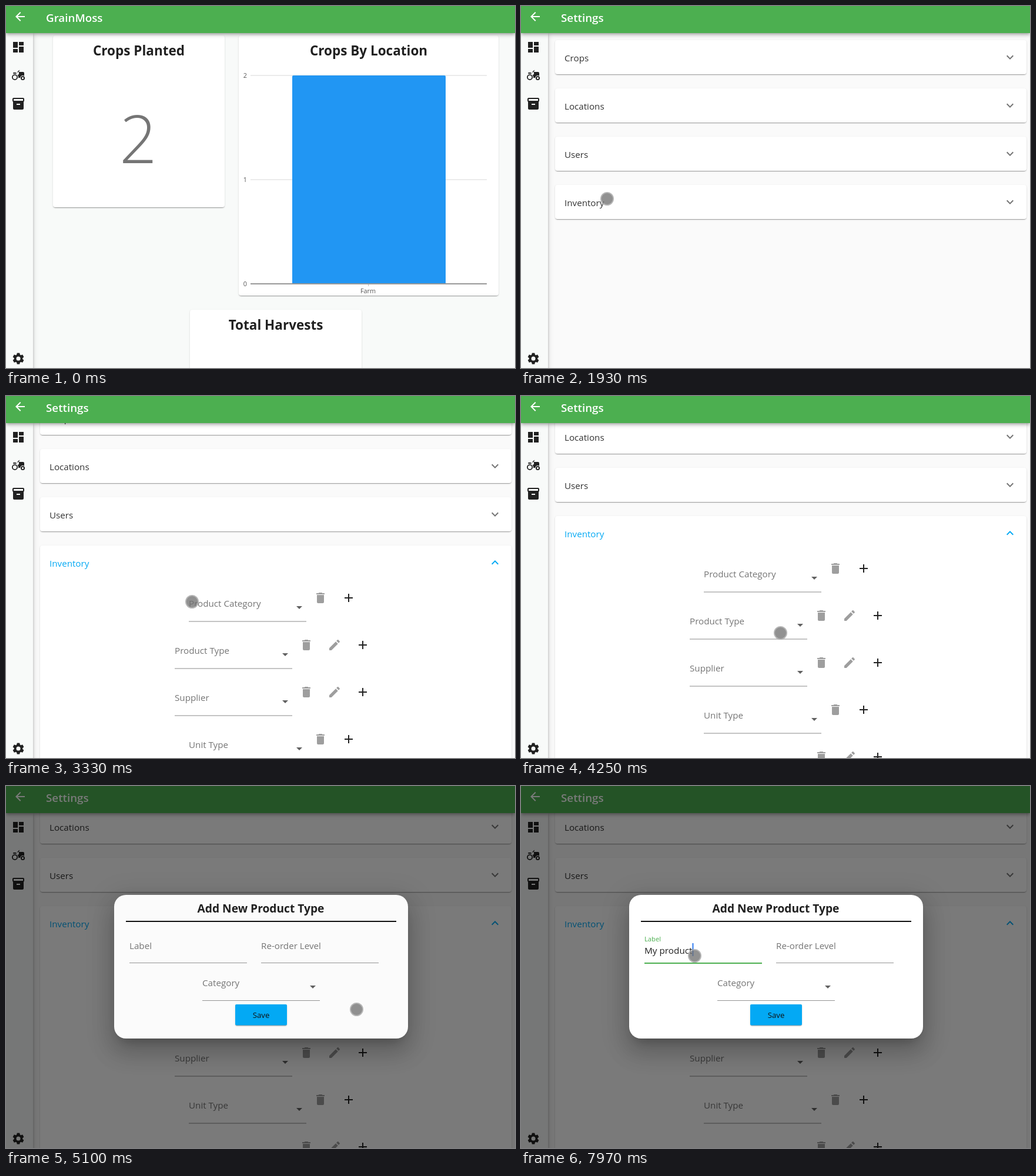
Recreate the animation shown at these times as an HTML page with a canvas. Size 866 by 615 pixels, loop 8 s.

```html
<!DOCTYPE html>
<html lang="en">
<head>
<meta charset="utf-8">
<title>Farm dashboard</title>
<style>
html, body { margin: 0; width: 100%; height: 100%; overflow: hidden; background: #fafafa; }
canvas { display: block; width: 866px; height: 615px; }
</style>
</head>
<body>
<canvas id="stage" width="866" height="615"></canvas>
<script>
const W = 866, H = 615, LOOP = 8000;
const ctx = document.getElementById('stage').getContext('2d');
const FONT = '"Open Sans", "Noto Sans", sans-serif';
const INK = '#212121', GREY = '#757575', PALE = '#9e9e9e', GREEN = '#4caf50', BLUE = '#03a9f4';

const ICONS = {
  back: 'M20 11H7.83l5.59-5.59L12 4l-8 8 8 8 1.41-1.41L7.83 13H20z',
  dashboard: 'M3 13h8V3H3zM3 21h8v-6H3zM13 21h8V11h-8zM13 3v6h8V3z',
  box: 'M20 2H4c-1 0-2 .9-2 2v3c0 .7.4 1.3 1 1.7V20c0 1.1 1.1 2 2 2h14c.9 0 2-.9 2-2V8.7c.6-.4 1-1 1-1.7V4c0-1.1-1-2-2-2zM15 14H9v-2h6zM20 7H4V4h16z',
  tractor: 'M19.5 12c.9 0 1.8.3 2.5.8V8c0-1.1-.9-2-2-2h-6.3l-1-1 1.4-1.5-.7-.7-3.6 3.6.7.7 1.5-1.5 1 1.3V9c0 1.1-.9 2-2 2h-.5c.9 1.1 1.5 2.5 1.5 4v1h3.1c.2-2.2 2.1-4 4.4-4zM4 9h5c0-1.1-.9-2-2-2H4c-1.3 0-1.3 2 0 2z',
  trash: 'M6 19c0 1.1.9 2 2 2h8c1.1 0 2-.9 2-2V7H6zM19 4h-3.5l-1-1h-5l-1 1H5v2h14z',
  pencil: 'M3 17.25V21h3.75L17.8 9.94l-3.75-3.75zM20.7 7.04c.4-.4.4-1 0-1.4l-2.3-2.35c-.4-.4-1-.4-1.4 0l-1.9 1.83 3.75 3.75z',
  plus: 'M19 13h-6v6h-2v-6H5v-2h6V5h2v6h6z',
  drop: 'M7 10l5 5 5-5z',
  more: 'M16.6 8.6L12 13.17 7.4 8.6 6 10l6 6 6-6z',
  less: 'M12 8l-6 6 1.4 1.4L12 10.83l4.6 4.57L18 14z'
};
for (const k in ICONS) ICONS[k] = new Path2D(ICONS[k]);

// Shadow layers: offset, blur, spread, alpha
const LOW = [[2, 1, -1, .2], [1, 1, 0, .14], [1, 3, 0, .12]];
const BAR = [[2, 4, -1, .2], [4, 5, 0, .14], [1, 10, 0, .12]];
const HIGH = [[11, 15, -7, .2], [24, 38, 3, .14], [9, 46, 8, .12]];

// Pointer path: tick, x, y
const PATH = [
  [0, 727.5, 572], [1, 648, 524], [3, 485, 511.5], [5, 283, 524], [7, 128, 580], [8, 92, 588], [10, 24.5, 597],
  [18, 24.5, 597], [19, 92, 586], [20, 155, 557], [21, 179.5, 448], [23, 146.5, 327.5],
  [35, 146.5, 327.5], [37, 316.5, 349.5],
  [44, 316.5, 349.5], [46, 300, 362], [48, 275.5, 419.5],
  [50, 275.5, 419.5], [51, 310, 416], [53, 441.5, 402.5], [55, 550, 389], [57, 591.5, 383.5],
  [58, 591.5, 383.5], [62, 596.5, 379.5],
  [67, 596.5, 379.5], [69, 545, 370], [71, 462, 348], [73, 318, 296], [74, 295.5, 288.5]
];

const clamp = v => Math.max(0, Math.min(1, v));
const ease = v => { v = clamp(v); return v * v * (3 - 2 * v); };

function text(str, x, y, size, color = INK, weight = 400, align = 'left') {
  ctx.font = `${weight} ${size}px ${FONT}`;
  ctx.fillStyle = color;
  ctx.textAlign = align;
  ctx.fillText(str, x, y);
}

function rect(x, y, w, h, color) {
  ctx.fillStyle = color;
  ctx.fillRect(x, y, w, h);
}

function round(x, y, w, h, r, color) {
  ctx.fillStyle = color;
  ctx.beginPath();
  ctx.roundRect(x, y, w, h, r);
  ctx.fill();
}

function disc(x, y, r, color) {
  ctx.fillStyle = color;
  ctx.beginPath();
  ctx.arc(x, y, r, 0, 7);
  ctx.fill();
}

function ring(x, y, r, width, color) {
  ctx.strokeStyle = color;
  ctx.lineWidth = width;
  ctx.beginPath();
  ctx.arc(x, y, r, 0, 7);
  ctx.stroke();
}

function raised(x, y, w, h, r, color, layers) {
  const far = 3000;
  for (const [off, blur, grow, alpha] of layers) {
    ctx.save();
    ctx.shadowColor = `rgba(0,0,0,${alpha})`;
    ctx.shadowBlur = blur;
    ctx.shadowOffsetX = far;
    ctx.shadowOffsetY = off;
    round(x - grow - far, y - grow, w + 2 * grow, h + 2 * grow, r, '#000');
    ctx.restore();
  }
  round(x, y, w, h, r, color);
}

function icon(name, x, y, color = INK) {
  ctx.save();
  ctx.translate(x - 12, y - 12);
  ctx.fillStyle = color;
  ctx.fill(ICONS[name], 'evenodd');
  ctx.restore();
}

function gear(x, y) {
  ctx.beginPath();
  for (let i = 0; i < 6; i++) {
    for (const [d, r] of [[-24, 7.2], [-13, 9.8], [13, 9.8], [24, 7.2]]) {
      const a = (i * 60 + d - 90) * Math.PI / 180;
      ctx.lineTo(x + r * Math.cos(a), y + r * Math.sin(a));
    }
  }
  ctx.closePath();
  ctx.moveTo(x + 3.5, y);
  ctx.arc(x, y, 3.5, 0, 2 * Math.PI);
  ctx.fillStyle = INK;
  ctx.fill('evenodd');
}

function dashboard() {
  rect(0, 0, W, H, '#f8faf9');
  for (const [x, y, s, title] of [[80, 50, 292, 'Crops Planted'], [396, 50, 442, 'Crops By Location'], [313, 516, 292, 'Total Harvests']]) {
    raised(x, y, s, s, 4, '#fff', LOW);
    text(title, x + s / 2, y + 34, 22.5, INK, 700, 'center');
  }
  text('2', 225, 267, 112, GREY, 300, 'center');
  for (let v = 0; v < 3; v++) {
    const y = 472 - 177 * v;
    if (v) rect(416, y - 1, 402, 2, '#ebebeb');
    text(v, 410, y + 4, 10.8, '#555', 400, 'right');
  }
  round(487, 118, 261, 354, [2, 2, 0, 0], '#2196f3');
  rect(416, 471, 402, 2, '#999');
  rect(616, 473, 1, 3, '#bbb');
  text('Farm', 616, 488, 10.8, '#555', 400, 'center');
}

function picker(label, x, y, line) {
  text(label, x, y, 15.2, GREY);
  icon('drop', x + 188, y + 1, '#616161');
  rect(x, y + 24, 200, line, line > 1 ? '#c4c4c4' : '#949494');
}

function inventory(top) {
  ['Product Category', 'Product Type', 'Supplier', 'Unit Type', 'Location Type'].forEach((label, i) => {
    const wide = i % 3 > 0 || i === 4, x = wide && i !== 3 ? 287 : 311;
    const y = top + 89 + 80 * i;
    picker(label, x, y + 15, 2);
    icon('trash', x + 224, y, PALE);
    if (x === 287) icon('pencil', x + 272, y, PALE);
    icon('plus', x === 287 ? 607 : 583, y);
  });
}

function settings(n) {
  rect(0, 0, W, H, '#fafafa');
  const scroll = n < 41 ? 0 : [50, 90][n - 41] || 100;
  const open = ease((n - 30) / 4);
  ['Crops', 'Locations', 'Users', 'Inventory'].forEach((name, i) => {
    const y = 58 + 82 * i - scroll, last = i === 3, on = last && open > 0;
    const h = 58 + (last ? 442 * open : 0);
    raised(58, y, 802, h, 4, '#fff', LOW);
    ctx.save();
    ctx.beginPath();
    ctx.rect(58, y, 802, h);
    ctx.clip();
    if (last && n >= 27 && n < 31) disc(146.5, 327.5, n < 28 ? 36 : 60, 'rgba(0,0,0,.06)');
    if (on) inventory(y);
    ctx.restore();
    text(name, 74, y + 36, 15.2, on ? BLUE : '#333');
    icon(on ? 'less' : 'more', 832, y + 29, on ? BLUE : GREY);
  });
}

function frame(title) {
  raised(0, 45, 46, H, 0, '#f8faf9', BAR);
  icon('dashboard', 21, 70);
  icon('tractor', 21, 118);
  ring(15, 121, 4.1, 1.8, INK);
  ring(28.5, 122.5, 2.6, 1.9, INK);
  icon('box', 21, 166);
  gear(21, 599);
  raised(0, 0, W, 46, 0, GREEN, BAR);
  icon('back', 24, 18, '#fff');
  text(title, 68, 27, 18.8, '#fff', 600);
}

function typed(n) {
  if (n < 85) return '';
  if (n < 90) return 'M';
  if (n < 92) return 'My ';
  const count = n < 94 ? 4 : n < 101 ? Math.min(9, n - 94 + 5) : 10;
  return 'My product'.slice(0, count);
}

function dialog(n) {
  rect(0, 0, W, H, 'rgba(0,0,0,.52)');
  raised(184, 185, 500, 244, 20, n < 65 ? '#fbfbfb' : '#fff', HIGH);
  text('Add New Product Type', 433.5, 215, 19.2, INK, 700, 'center');
  rect(204, 229, 460, 2, '#111');

  const f = ease((n - 75) / 4);
  rect(210, 300, 200, 1, '#949494');
  if (f) rect(310 - 100 * f, 300, 200 * f, 2, GREEN);
  text('Label', 210, 277 - 13 * f, 15.2 - 4 * f, f ? GREEN : GREY);
  const value = typed(n);
  text(value, 210, 285, 15.3);
  if (n >= 79 && n < 83 || n >= 85) {
    const cx = 210 + ctx.measureText(value).width;
    rect(cx, value ? 267 : 269, 2, value ? 22 : 18, '#2f7bf0');
  }

  text('Re-order Level', 434, 277, 15.2, GREY);
  rect(434, 300, 200, 1, '#949494');
  picker('Category', 334, 340, 1);
  raised(390, 371, 88, 35.5, 2, BLUE, LOW);
  text('Save', 434, 394, 13.2, '#111', 500, 'center');
}

function pointer(n) {
  if (n < 0) return;
  const next = PATH.findIndex(k => k[0] > n);
  const b = PATH[next < 0 ? PATH.length - 1 : next];
  const a = PATH[next < 0 ? PATH.length - 1 : next - 1];
  const p = b === a ? 0 : (n - a[0]) / (b[0] - a[0]);
  const x = a[1] + (b[1] - a[1]) * p, y = a[2] + (b[2] - a[2]) * p;
  disc(x, y, 10, 'rgba(112,112,112,.77)');
  ring(x, y, 10.5, 2, 'rgba(170,170,170,.85)');
}

function draw(now) {
  // The screen refreshes in steps of about 1/13 s
  const n = Math.floor((now % LOOP - 137) / 77.4);
  const onSettings = n >= 15;
  if (onSettings) settings(n); else dashboard();
  frame(onSettings ? 'Settings' : 'GrainMoss');
  if (n >= 64) dialog(n);
  pointer(n);
}

const start = performance.now();
function loop() {
  draw(performance.now() - start);
  requestAnimationFrame(loop);
}
loop();
</script>
</body>
</html>
```
